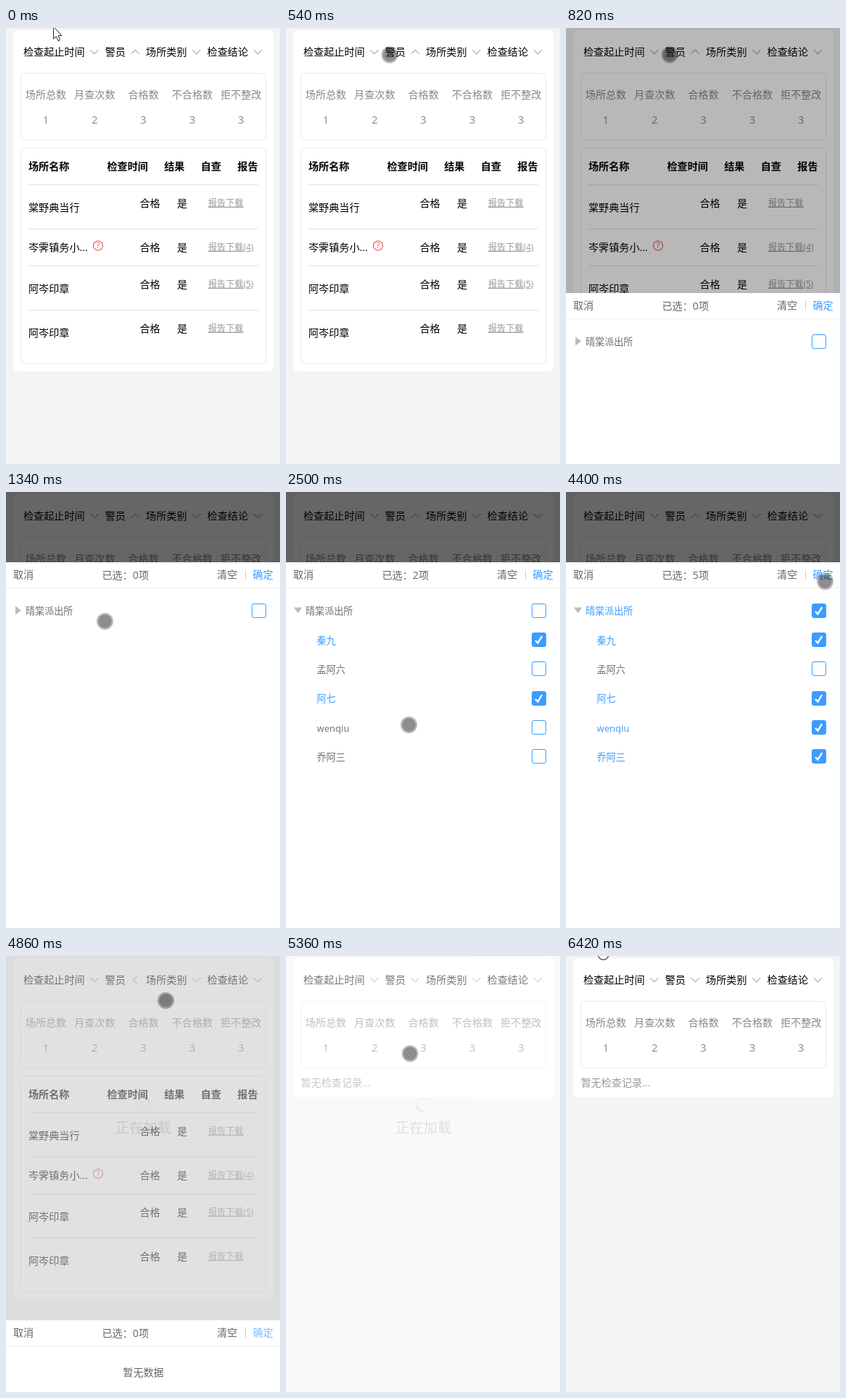
Write an HTML page that moves like this. It is 378 px wide and 602 px high and loops after 6560 ms.

```html
<!DOCTYPE html>
<html lang="zh-CN">
<head>
<meta charset="utf-8">
<style>
  html, body { margin: 0; width: 100%; height: 100%; overflow: hidden; background: #f4f4f4; }
  svg { display: block; width: 378px; height: 602px; }
  text { font-family: "Open Sans", "Noto Sans CJK SC", "Noto Sans CJK", sans-serif; white-space: pre; }
</style>
</head>
<body>
<svg id="stage" viewBox="0 0 378 602"></svg>
<script>
const LOOP = 6560, W = 378, H = 602, SHEET = 505;
const BLUE = '#3c9cff', GREY = '#666', BODY = 14.11, FADE = 300;
const EXPAND = 1620, CONFIRM = 4619, LOAD = 4710, REPLACED = 5100, LOADED = 5200;
const stage = document.getElementById('stage');

const ramp = (t, from, to) => Math.min(1, Math.max(0, (t - from) / (to - from)));
// Rises at one time and falls again at another
const visible = (t, on, off) => ramp(t, on, on + FADE) - ramp(t, off, off + FADE);

// Text placed by its left edge and vertical centre
const text = (x, cy, str, fill = '#000', size = BODY, extra = '') =>
  `<text x="${x}" y="${cy + size * .37}" fill="${fill}" font-size="${size}" ${extra}>${str}</text>`;
const centred = (x, cy, str, fill, size) => text(x, cy, str, fill, size, 'text-anchor="middle"');
const rect = (x, y, w, h, fill, extra = '') =>
  `<rect x="${x}" y="${y}" width="${w}" height="${h}" fill="${fill}" ${extra}/>`;
const box = (y, h) => rect(20.5, y, 338, h, 'none', 'rx="6" stroke="#e9e9e9"');
const rule = (y, x1, x2, color) => `<path d="M${x1} ${y}H${x2}" stroke="${color}"/>`;
const line = (d, color, width, extra = '') =>
  `<path d="${d}" fill="none" stroke="${color}" stroke-width="${width}" ${extra}/>`;
const disc = (x, y, r, extra) => `<circle cx="${x}" cy="${y}" r="${r}" ${extra}/>`;

// Lays labels out left to right with an equal gap
function flow(labels, x, gap, item) {
  return labels.map((label, i) => {
    const left = x, right = x + label.length * BODY;
    x = right + gap;
    return item(label, left, right, i);
  }).join('');
}

const filters = ['检查起止时间', '警员', '场所类别', '检查结论'];
const stats = [['场所总数', 1], ['月查次数', 2], ['合格数', 3], ['不合格数', 3], ['拒不整改', 3]];
const places = [
  { name: '棠野典当行' }, { name: '岑霁镇务小...', reports: 4, flagged: true },
  { name: '阿岑印章', reports: 5 }, { name: '阿岑印章' }
];
// Label and the time it becomes ticked
const people = [
  ['晴棠派出所', 3300], ['秦九', 1960], ['孟阿六', Infinity],
  ['阿七', 2440], ['wenqiu', 2620], ['乔阿三', 3300]
];

function buildTable() {
  const head = (s, x) => text(x, 191, s, '#000', BODY, 'font-weight="700"');
  let top = 216.5;
  const rows = places.map(({ name, reports, flagged }) => {
    const y = top;
    top += flagged ? 51 : 61;
    return rule(y, 31, 348, '#e2e2e2')
      + text(31, y + (flagged ? 25.5 : 31), name)
      + text(184.5, y + 25.3, '合格') + text(236, y + 25.3, '是')
      + text(279, y + 24.8, '报告下载' + (reports ? `(${reports})` : ''), '#999', 12.1, 'text-decoration="underline"')
      + (flagged ? disc(127, y + 23, 6.5, 'fill="none" stroke="#f04848" stroke-width="1.1"')
        + centred(127, y + 23, '?', '#f04848', 10.5) : '');
  });
  return box(165.5, 298) + head('场所名称', 31)
    + flow(['检查时间', '结果', '自查', '报告'], 139.5, 22.3, head) + rows.join('');
}
const table = buildTable();

function page(t) {
  const empty = t >= REPLACED;
  const turn = 180 * (1 - ramp(t, LOAD, LOAD + FADE));
  return rect(10, 3, 359, empty ? 192 : 471, '#fff', 'rx="6"')
    + flow(filters, 24, 28.1, (s, x, right, i) => text(x, 33, s)
      + line('M-5.5 -2.8L0 2.8L5.5 -2.8', '#b8b8b8', 1.3,
        `transform="translate(${right + 13.3} 33) rotate(${i === 1 ? turn : 0})"`))
    + box(62.5, 92)
    + stats.map(([s, n], i) => centred(55 + i * 67.3, 92, s, '#888')
      + centred(55 + i * 67.3, 126.3, n, '#888', 14.8)).join('')
    + (empty ? text(20.5, 175, '暂无检查记录...', '#999') : table);
}

function loader(t) {
  return `<g opacity="${visible(t, LOAD, LOADED)}">` + rect(0, 0, W, H, '#fff')
    + disc(189, 205, 9.5, 'fill="none" stroke="#f2f2f2" stroke-width="1.5"')
    + line('M6.7 -6.7A9.5 9.5 0 0 1 6.7 6.7', '#d4d4d4', 1.5,
      `transform="translate(189 205) rotate(${t * .36})"`)
    + centred(189.5, 237, '正在加载', '#c8c8c8', 19.2) + '</g>';
}

const checkbox = (y, on) => rect(339.5, y - 9.5, 19, 19, on ? BLUE : '#fff', `rx="2.5" stroke="${BLUE}"`)
  + (on ? line(`M344 ${y + 1}L347.4 ${y + 4.6}L353.2 ${y - 5}`, '#fff', 2.4) : '');

function tree(t) {
  const open = t >= EXPAND;
  const arrow = open ? 'M11 62.5H22L16.5 70.5Z' : 'M13 60.5V72.5L21 66.5Z';
  return `<path d="${arrow}" fill="#bbb"/>`
    + people.slice(0, open ? people.length : 1).map(([name, at], i) => {
      const y = 67 + i * 40.35, on = t >= at;
      return text(i ? 42.5 : 27, y + (i && .5), name, on ? BLUE : '#707070', 13.1)
        + checkbox(Math.floor(y), on);
    }).join('');
}

function panel(t) {
  const shown = visible(t, 680, CONFIRM);
  if (t < 740 || shown <= 0) return '';
  const cleared = t >= CONFIRM;
  const count = cleared ? 0 : people.filter(([, at]) => t >= at).length;
  return rect(0, 0, W, H, '#000', `opacity="${.6 * shown}"`)
    + `<g transform="translate(0 ${Math.round(H - SHEET * shown)})">` + rect(0, 0, W, H, '#fff')
    + text(10, 17, '取消', GREY) + text(132.5, 17.3, `已选：${count}项`, GREY)
    + text(291, 17, '清空', GREY) + rect(330, 10, 1, 14, '#ccc')
    + text(340.5, 17, '确定', cleared ? '#7dbdff' : BLUE)
    + rule(35.5, 0, W, '#eee')
    + (cleared ? centred(189.5, 72, '暂无数据', GREY) : tree(t)) + '</g>';
}

// Pointer glides: start, end, x, y
const glides = [
  [80, 540, 143, 37], [1000, 1340, 136.5, 178.5], [1340, 1460, 114.5, 170.5],
  [1680, 2240, 148.5, 268], [2420, 2500, 169.5, 321.5], [2560, 3040, 355, 337],
  [3100, 3220, 354, 362], [3340, 3660, 352, 272], [3820, 4400, 357.5, 123.5],
  [4540, 4860, 220.5, 61.5], [4860, 5180, 190, 203], [5240, 5620, 130, -13]
];

function pointer(t) {
  if (t < 80) return '<path d="M65.5 -2V15L69.4 11.6L72 17.8L74.6 16.7L72 10.6H77Z" fill="#fff" stroke="#222"/>';
  if (t >= 6280) return disc(113 - 61.5 * ramp(t, 6280, 6420), -2, 7.2, 'fill="#fff" stroke="#333" stroke-width="1.2"');
  let x = 76, y = 4;
  for (const [from, to, toX, toY] of glides) {
    const k = ramp(t, from, to);
    x += (toX - x) * k;
    y += (toY - y) * k;
  }
  return disc(x, y, 11.5, 'opacity=".27"') + disc(x, y, 9.3, 'opacity=".24"');
}

function draw(now) {
  const t = now % LOOP;
  stage.innerHTML = rect(0, 0, W, H, '#f4f4f4') + page(t) + loader(t) + panel(t) + pointer(t);
}

let start;
function tick(now) {
  start ??= now;
  draw(now - start);
  requestAnimationFrame(tick);
}
draw(0);
requestAnimationFrame(tick);
</script>
</body>
</html>
```
